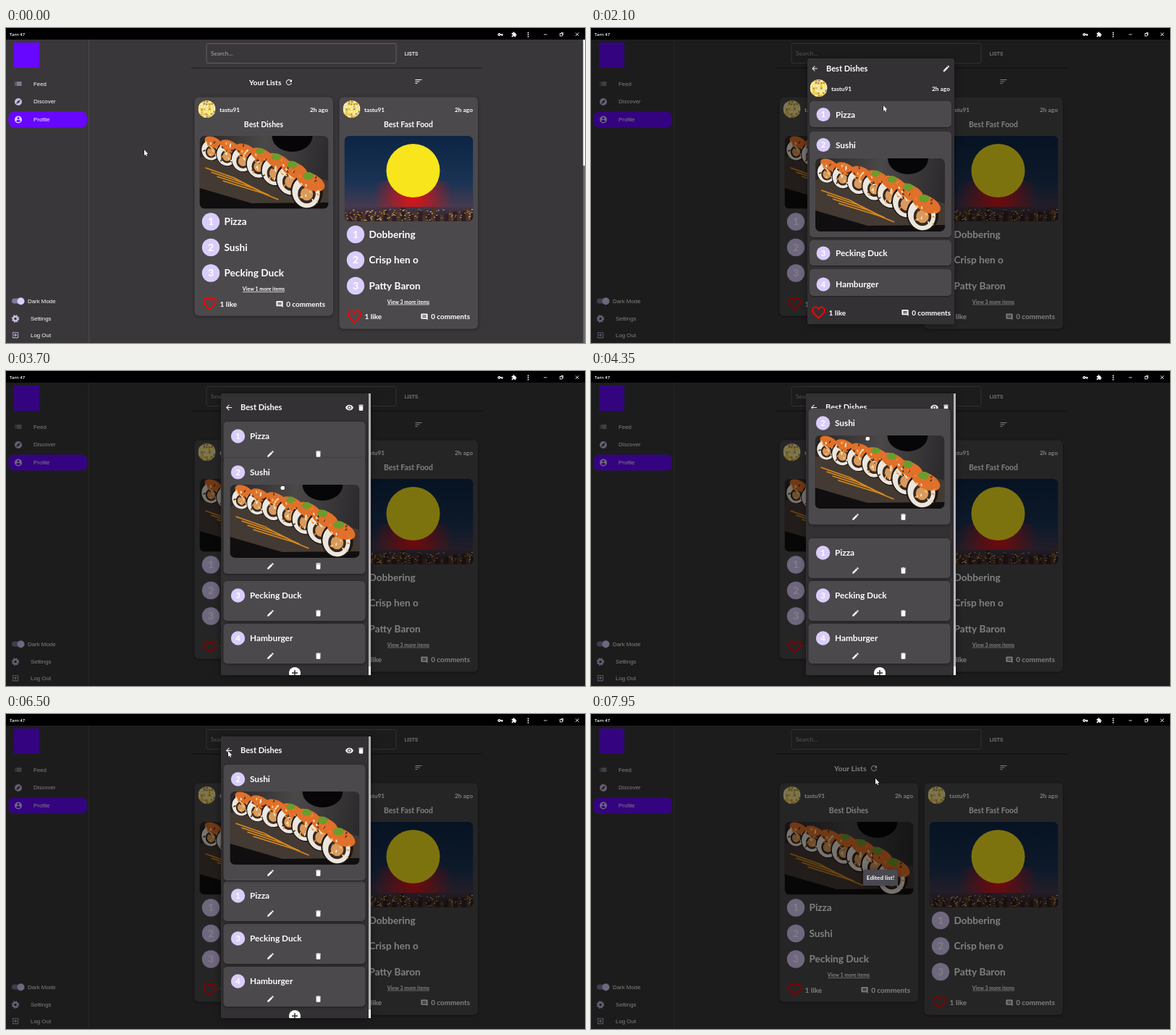
An HTML page with a canvas for the animation above (8 s loop, 800x435 px).

```html
<!DOCTYPE html>
<html lang="en">
<head>
<meta charset="utf-8">
<title>Lists</title>
<style>
html, body { margin: 0; width: 100%; height: 100%; overflow: hidden; background: #3a373a; }
canvas { display: block; }
</style>
</head>
<body>
<canvas id="stage" width="800" height="435"></canvas>
<script>
const W = 800, H = 435, LOOP = 8000, BAR = 16;
const screen = document.getElementById('stage').getContext('2d');
const layer = Object.assign(document.createElement('canvas'), { width: W, height: H }).getContext('2d');
let c = screen;

const PAGE = '#3a373a', PAPER = '#343134', CARD = '#4b494c';
const LILAC = '#dacdfb', PURPLE = '#6807ff';
const USER = 'tastu91';

const ICONS = {
  edit: 'M3 17.25V21h3.75L17.81 9.94l-3.75-3.75zM20.71 7.04a1 1 0 0 0 0-1.41l-2.34-2.34a1 1 0 0 0-1.41 0l-1.83 1.83 3.75 3.75z',
  trash: 'M6 19c0 1.1.9 2 2 2h8c1.1 0 2-.9 2-2V7H6zM19 4h-3.5l-1-1h-5l-1 1H5v2h14z',
  back: 'M20 11H7.83l5.59-5.59L12 4l-8 8 8 8 1.41-1.41L7.83 13H20z',
  eye: 'M12 4.5C7 4.5 2.73 7.61 1 12c1.73 4.39 6 7.5 11 7.5s9.27-3.11 11-7.5c-1.73-4.39-6-7.5-11-7.5zM12 17a5 5 0 1 1 0-10 5 5 0 0 1 0 10zm0-8a3 3 0 1 0 0 6 3 3 0 0 0 0-6z',
  refresh: 'M17.65 6.35A8 8 0 1 0 19.73 14h-2.08A6 6 0 1 1 12 6c1.66 0 3.14.69 4.22 1.78L13 11h7V4z',
  sort: 'M3 18h6v-2H3zM3 6v2h18V6zm0 7h12v-2H3z',
  list: 'M3 13h2v-2H3zm0 4h2v-2H3zm0-8h2V7H3zm4 4h14v-2H7zm0 4h14v-2H7zM7 7v2h14V7z',
  explore: 'M12 2a10 10 0 1 0 0 20 10 10 0 0 0 0-20zm2.2 12.2L6 18l3.8-8.2L18 6z',
  person: 'M12 2a10 10 0 1 0 0 20 10 10 0 0 0 0-20zm0 3a3 3 0 1 1 0 6 3 3 0 0 1 0-6zm0 14.2a7.2 7.2 0 0 1-6-3.22c.03-1.99 4-3.08 6-3.08s5.97 1.09 6 3.08a7.2 7.2 0 0 1-6 3.22z',
  comment: 'M22 4a2 2 0 0 0-2-2H4a2 2 0 0 0-2 2v12a2 2 0 0 0 2 2h14l4 4zM18 14H6v-2h12zm0-3H6V9h12zm0-3H6V6h12z',
  logout: 'M10.1 15.6 11.5 17l5-5-5-5-1.4 1.4L12.7 11H3v2h9.7zM19 3H5a2 2 0 0 0-2 2v4h2V5h14v14H5v-4H3v4a2 2 0 0 0 2 2h14a2 2 0 0 0 2-2V5a2 2 0 0 0-2-2z',
  key: 'M12.65 10A6 6 0 1 0 12.65 14H17v4h4v-4h2v-4zM7 14a2 2 0 1 1 0-4 2 2 0 0 1 0 4z',
  puzzle: 'M20.5 11H19V7a2 2 0 0 0-2-2h-4V3.5a2.5 2.5 0 0 0-5 0V5H4a2 2 0 0 0-2 2v3.8h1.5a2.7 2.7 0 0 1 0 5.4H2V20a2 2 0 0 0 2 2h3.8v-1.5a2.7 2.7 0 0 1 5.4 0V22H17a2 2 0 0 0 2-2v-4h1.5a2.5 2.5 0 0 0 0-5z'
};
for (const name in ICONS) ICONS[name] = new Path2D(ICONS[name]);
const HEART = new Path2D('M12 20.5C5.4 14.6 2.5 12 2.5 8.5A5 5 0 0 1 12 6.2A5 5 0 0 1 21.5 8.5C21.5 12 18.6 14.6 12 20.5z');
const POINTER = new Path2D('M0 0V8L1.8 6.4 3 9 4.2 8.4 3.1 5.9H5.5z');

// ---- timing helpers ----
const clamp = v => Math.max(0, Math.min(1, v));
const mix = (a, b, k) => a + (b - a) * k;
const smooth = k => k * k * (3 - 2 * k);

// cubic-bezier(.4, 0, .2, 1)
function ease(x) {
  let lo = 0, hi = 1;
  for (let i = 0; i < 20; i++) {
    const m = (lo + hi) / 2, n = 1 - m;
    if (1.2 * n * n * m + 0.6 * n * m * m + m * m * m < x) lo = m; else hi = m;
  }
  return lo * lo * (3 - 2 * lo);
}
const ramp = (t, start, length) => ease(clamp((t - start) / length));

function random(seed) {
  return () => (seed = (seed * 16807) % 2147483647) / 2147483647;
}

// ---- drawing helpers ----
function box(x, y, w, h, r, fill) {
  c.beginPath();
  c.roundRect(x, y, w, h, r);
  c.fillStyle = fill;
  c.fill();
}
function shadowBox(x, y, w, h, r, fill, blur = 4) {
  c.save();
  c.shadowColor = 'rgba(0,0,0,.4)';
  c.shadowBlur = blur;
  c.shadowOffsetY = 1;
  box(x, y, w, h, r, fill);
  c.restore();
}
function oval(x, y, rx, ry, fill, turn = 0) {
  c.beginPath();
  c.ellipse(x, y, rx, ry, turn, 0, 7);
  c.fillStyle = fill;
  c.fill();
}
const disc = (x, y, r, fill) => oval(x, y, r, r, fill);
function line(color, width, ...points) {
  c.beginPath();
  points.forEach(([x, y]) => c.lineTo(x, y));
  c.strokeStyle = color;
  c.lineWidth = width;
  c.stroke();
}
function text(s, x, y, size, { align = 'left', color = '#fff', weight = 'bold', face = 'Lato' } = {}) {
  c.font = `${weight} ${size}px ${face}, sans-serif`;
  c.textAlign = align;
  c.textBaseline = 'middle';
  c.fillStyle = color;
  c.fillText(s, x, y + 0.5);
}
function icon(name, x, y, size, color = '#fff') {
  c.save();
  c.translate(x - size / 2, y - size / 2);
  c.scale(size / 24, size / 24);
  c.fillStyle = color;
  c.fill(ICONS[name], 'evenodd');
  c.restore();
}
function clipped(x, y, w, h, r, draw) {
  c.save();
  c.beginPath();
  c.roundRect(x, y, w, h, r);
  c.clip();
  c.translate(x, y);
  draw(w, h);
  c.restore();
}
function badge(n, x, y, r) {
  disc(x, y, r, LILAC);
  text(n, x, y, r * 1.15, { align: 'center' });
}
function heart(x, y, size) {
  c.save();
  c.translate(x - size / 2, y - size / 2);
  c.scale(size / 24, size / 24);
  c.strokeStyle = '#f00';
  c.lineWidth = 2.2;
  c.stroke(HEART);
  c.restore();
}
function avatar(x, y) {
  clipped(x - 12, y - 12, 24, 24, 12, () => {
    box(0, 0, 24, 24, 0, '#f3dc6a');
    const rnd = random(77), tones = ['#fff6d8', '#b0844c', '#e8b93a', '#fff6d8', '#8f7a90'];
    for (let i = 0; i < 49; i++) {
      box(i % 7 * 3.5 + rnd(), Math.floor(i / 7) * 3.5 + rnd(), 2.2, 2.2, .6, tones[Math.floor(rnd() * 5)]);
    }
  });
}

// ---- photos ----
function sushi(x, y, w, h) {
  clipped(x, y, w, h, 7, () => {
    const g = c.createLinearGradient(0, 0, w, 30);
    g.addColorStop(0, '#2a2624');
    g.addColorStop(.5, '#4a4848');
    g.addColorStop(1, '#2c2a2c');
    box(0, 0, w, h, 0, g);
    oval(128, 0, 28, 22, '#060608');
    c.beginPath();
    [[0, 30], [30, 24], [w, 62], [w, h], [64, h], [0, 74]].forEach(p => c.lineTo(...p));
    c.fillStyle = '#443a34';
    c.fill();
    c.beginPath();
    [[0, 72], [72, 93], [w, 92], [w, h], [0, h]].forEach(p => c.lineTo(...p));
    c.fillStyle = '#100e0e';
    c.fill();
    for (let i = 0; i < 4; i++) line('#d98a1c', 1.6, [8 + i * 8, 44 + i * 6], [48 + i * 13, 58 + i * 7], [70 + i * 13, 70 + i * 6]);
    const rnd = random(311);
    for (let i = 0; i < 7; i++) {
      const k = i / 6, px = mix(16, 148, k), py = 16 + 38 * k + 20 * k ** 4, r = mix(14, 22, k);
      oval(px, py + 3, r, r * 1.1, '#1c1614', -.3);
      oval(px - 1, py + 4, r * .86, r * .98, '#ece6dc', -.3);
      oval(px, py + 6, r * .56, r * .6, '#352a24');
      oval(px, py + 6, r * .4, r * .42, '#d99a5c');
      oval(px + r * .25, py - r * .5, r * .95, r * .5, '#e0702a', .45);
      for (let n = 0; n < 16; n++) {
        const a = rnd() * 6.3, d = rnd() * r;
        oval(px + Math.cos(a) * d, py + Math.sin(a) * d, 2, 1, ['#f4e9d2', '#f08a30', '#5a3420', '#fbc87c'][n % 4], a);
      }
      if (i > 2) oval(px + r * .1, py - r * .85, r * .34, r * .24, '#6c9c2c');
    }
  });
}
function night(x, y, w, h) {
  clipped(x, y, w, h, 7, () => {
    const sky = c.createLinearGradient(0, 0, 0, h);
    sky.addColorStop(0, '#0c2544');
    sky.addColorStop(.55, '#1a3354');
    sky.addColorStop(.82, '#453a50');
    sky.addColorStop(1, '#2a1c1e');
    box(0, 0, w, h, 0, sky);
    const glow = c.createRadialGradient(95, 84, 4, 95, 84, 55);
    glow.addColorStop(0, 'rgba(215,20,24,1)');
    glow.addColorStop(1, 'rgba(215,20,24,0)');
    box(40, 62, 110, 36, 0, glow);
    const rnd = random(2024);
    for (let i = 0; i < 30; i++) {
      const tall = 8 + rnd() * 11;
      box(i * 6, h - tall, 6, tall, 0, i % 2 ? '#2c2024' : '#4a332a');
    }
    for (let i = 0; i < 130; i++) box(rnd() * w, h - 2 - rnd() * 15, 1.8, 1.1, 0, i % 3 ? '#c88a34' : '#f0cf78');
    disc(95, 48, 37, '#f8e51c');
  });
}

// ---- page ----
function titleBar() {
  box(0, 0, W, BAR, 0, '#000');
  text('Tarn 47', 5, 9, 6, { face: 'Open Sans', weight: '600' });
  icon('key', 683, 9, 8);
  icon('puzzle', 702, 9, 8);
  for (const y of [6.5, 9.2, 11.9]) disc(721.5, y, .9, '#fff');
  line('#fff', .8, [743, 9], [747.5, 9]);
  c.strokeRect(765.5, 7.5, 3, 3.5);
  line('#fff', .8, [767, 6.5], [769.8, 6.5], [769.8, 10]);
  line('#fff', .9, [787, 6.5], [791.5, 11]);
  line('#fff', .9, [787, 11], [791.5, 6.5]);
}
function sidebar() {
  const label = (s, x, y) => text(s, x, y, 7.9, { face: 'Liberation Sans', weight: 'normal' });
  line('#4c494c', 1, [114.5, BAR], [114.5, H]);
  box(11, 20, 35, 35, 0, PURPLE);
  box(3.5, 115.5, 108.5, 22, 8, PURPLE);
  icon('list', 17, 77, 12, '#c9bddf');
  icon('explore', 17, 102, 12, '#c9bddf');
  icon('person', 17, 126.5, 12, LILAC);
  label('Feed', 38, 77);
  label('Discover', 38, 101.5);
  label('Profile', 38, 126.5);
  box(8, 373.5, 17, 7, 3.5, '#81789a');
  disc(20.5, 377.3, 5, LILAC);
  label('Dark Mode', 30, 377);
  c.setLineDash([1.9, 1.65]);
  c.beginPath();
  c.arc(13, 401.5, 4.5, 0, 7);
  c.strokeStyle = '#c9bddf';
  c.lineWidth = 1.5;
  c.stroke();
  c.setLineDash([]);
  c.beginPath();
  c.arc(13, 401.5, 3, 0, 7);
  c.lineWidth = 2.4;
  c.stroke();
  icon('logout', 13, 424, 11, '#c9bddf');
  label('Settings', 34, 401.5);
  label('Log Out', 34, 424);
}
function socialRow(x, y, right) {
  heart(x, y, 21);
  text('1 like', x + 14, y, 10);
  text('0 comments', right, y, 9.9, { align: 'right' });
  icon('comment', right - 63, y + .5, 11);
}
function listCard(x, height, title, names, more, photo, photoHeight) {
  shadowBox(x - .5, 95.5, 191.5, height + 1, 6, CARD);
  avatar(x + 16.5, 112);
  text(USER, x + 34, 113, 8.2);
  text('2h ago', x + 184, 113, 8.4, { align: 'right' });
  text(title, x + 95, 133, 10.4, { align: 'center' });
  photo(x + 6.5, 149, 178, photoHeight);
  const first = 149 + photoHeight + 18;
  names.forEach((name, i) => {
    const y = first + i * 35.5;
    badge(i + 1, x + 22, y, 12.2);
    text(name, x + 40.5, y, 13.6);
  });
  const y = first + 93;
  text(more, x + 95, y, 7, { align: 'center' });
  line('#fff', .7, [x + 66, y + 4], [x + 124, y + 4]);
  socialRow(x + 20.5, first + 113.5, x + 180);
}
function page() {
  box(0, 0, W, H, 0, PAGE);
  titleBar();
  sidebar();
  box(256, 54.5, 402, 1.5, 0, 'rgba(0,0,0,.35)');
  c.beginPath();
  c.roundRect(277, 21.5, 262, 27, 2);
  c.strokeStyle = '#626062';
  c.lineWidth = 1;
  c.stroke();
  text('Search...', 283, 35, 8.3, { color: '#aba9ab', weight: 'normal' });
  text('LISTS', 560, 35, 7, { align: 'center', face: 'Roboto', weight: '500' });
  text('Your Lists', 336, 75, 10.3);
  icon('refresh', 391, 75, 12);
  icon('sort', 570, 74, 12);
  listCard(261, 301, 'Best Dishes', ['Pizza', 'Sushi', 'Pecking Duck'], 'View 1 more items', sushi, 100.5);
  listCard(461, 319, 'Best Fast Food', ['Dobbering', 'Crisp hen o', 'Patty Baron'], 'View 3 more items', night, 118);
}
function pageScrollbar() {
  box(797.5, BAR, 2.5, H - BAR, 0, '#6d6b6d');
  box(797.5, BAR, 2.5, 174, 0, '#fff');
}

// ---- dialogs ----
function loader(y, t) {
  for (let i = 0; i < 5; i++) {
    const tall = 8 + 4 * Math.sin(t / 159 - i * .7);
    box(387 + i * 5.6, y - tall / 2, 2.8, tall, 1.3, PURPLE);
  }
}
function viewLoading(t) {
  shadowBox(348, 167, 104, 118, 2, PAPER, 10);
  icon('back', 358, 181, 11);
  text('Loading...', 376, 181, 11);
  icon('edit', 441, 181, 11);
  avatar(365, 208);
  text('Loading...', 382, 209, 8);
  text('51y ago', 446, 209, 8, { align: 'right' });
  loader(270, t);
}
function viewList() {
  shadowBox(299, 42, 203, 367, 2, PAPER, 10);
  icon('back', 309, 56, 11);
  text('Best Dishes', 325, 56, 11);
  icon('edit', 491, 56, 11);
  avatar(314.5, 83);
  text(USER, 332, 84, 8.2);
  text('2h ago', 496, 84, 8.4, { align: 'right' });
  [['Pizza', 101, 36], ['Sushi', 143, 146], ['Pecking Duck', 293, 35], ['Hamburger', 333, 37]].forEach(([name, y, h], i) => {
    const mid = y + (i < 2 ? 18.5 : 18) + (i > 2 ? 3 : 0);
    shadowBox(302, y, 196, h, 5, CARD, 2);
    badge(i + 1, 321, mid, 9.5);
    text(name, 338, mid, 11.8);
  });
  sushi(310, 180, 179, 101);
  socialRow(314.5, 393, 497);
}
function editLoading(t) {
  shadowBox(342, 191, 116, 70, 2, PAPER, 10);
  icon('back', 353, 210, 11);
  text('Loading...', 370, 210, 11);
  icon('eye', 431, 210, 11);
  icon('trash', 447, 210, 11);
  loader(245, t);
}
function editItem(n, name, top, height = 55) {
  shadowBox(300.5, top, 196, height, 5, CARD, 4);
  badge(n, 320.5, top + 20, 9.7);
  text(name, 337, top + 20, 11.8);
  if (height > 55) sushi(309.5, top + 37, 179, 101);
  icon('edit', 365.5, top + height - 10.5, 11.5);
  icon('trash', 431.5, top + height - 10.5, 11.5);
}
function editList(t) {
  shadowBox(297, 31, 207, 389, 2, PAPER, 10);
  icon('back', 308, 50.5, 12);
  text('Best Dishes', 324, 50, 11);
  icon('eye', 474.5, 50.5, 12);
  icon('trash', 490.5, 50.5, 11);
  const dragged = 129 + (t < DRAG ? 0 : cursorAt(Math.min(t, DROP))[1] - GRAB_Y);
  editItem(1, 'Pizza', mix(70, 231, ramp(t, 3850, 230)));
  editItem(3, 'Pecking Duck', 290);
  editItem(4, 'Hamburger', 349);
  editItem(2, 'Sushi', mix(dragged, 70, ramp(t, DROP, 330)), 160);
  clipped(297, 404, 207, 16, 0, () => {
    disc(102, 13, 8, '#fff');
    line(PAPER, 1.6, [98, 13], [106, 13]);
    line(PAPER, 1.6, [102, 9], [102, 17]);
  });
  box(501, 31, 3, 377, 0, '#b4b2b4');
  box(501, 408, 3, 12, 0, '#fff');
}
function message() {
  shadowBox(376, 215, 48, 22, 2, '#49474f', 8);
  text('Edited list!', 400, 226, 8.2, { align: 'center' });
}
function modal(opacity, draw, t) {
  if (opacity <= 0) return;
  box(0, BAR, W, H - BAR, 0, `rgba(0,0,0,${opacity / 2})`);
  layer.clearRect(0, 0, W, H);
  c = layer;
  draw(t);
  c = screen;
  c.globalAlpha = opacity;
  c.drawImage(layer.canvas, 0, 0);
  c.globalAlpha = 1;
}

// ---- pointer ----
const OPEN = 1130, DRAG = 3550, DROP = 4500, GRAB_Y = 168;
const PATH = [
  [300, 191, 168], [950, 361, 130], [1800, 361, 130], [2600, 497, 57], [2950, 497, 57],
  [3450, 382, GRAB_Y], [DRAG, 382, GRAB_Y], [4250, 382, 91], [DROP, 382, 91], [5100, 377, 89],
  [5350, 377, 89], [6000, 307, 51], [7350, 307, 51], [7950, 393, 89]
];
function cursorAt(t) {
  const i = PATH.findIndex(p => p[0] > t);
  if (i === 0) return PATH[0].slice(1);
  if (i < 0) return PATH[PATH.length - 1].slice(1);
  const a = PATH[i - 1], b = PATH[i], k = smooth((t - a[0]) / (b[0] - a[0]));
  return [mix(a[1], b[1], k), mix(a[2], b[2], k)];
}
function pointer(t) {
  const [x, y] = cursorAt(t);
  if (t >= DRAG && t < DROP) {
    box(x - 2.5, y, 5.5, 5, 2, '#fff');
    return;
  }
  c.save();
  c.translate(x, y);
  c.fillStyle = '#fff';
  c.strokeStyle = '#000';
  c.lineWidth = .8;
  c.stroke(POINTER);
  c.fill(POINTER);
  c.restore();
}

function render(t) {
  page();
  if (t < OPEN) pageScrollbar();
  modal(ramp(t, OPEN, 225) - ramp(t, 2815, 195), t < 1400 ? viewLoading : viewList, t);
  modal(ramp(t, 2815, 225) - ramp(t, 6560, 195), t < 3150 ? editLoading : editList, t);
  modal(ramp(t, 6700, 225), message, t);
  pointer(t);
}

const start = performance.now();
function tick() {
  const t = (performance.now() - start) % LOOP;
  render(Math.floor(t / 50) * 50);
  requestAnimationFrame(tick);
}
tick();
</script>
</body>
</html>
```
